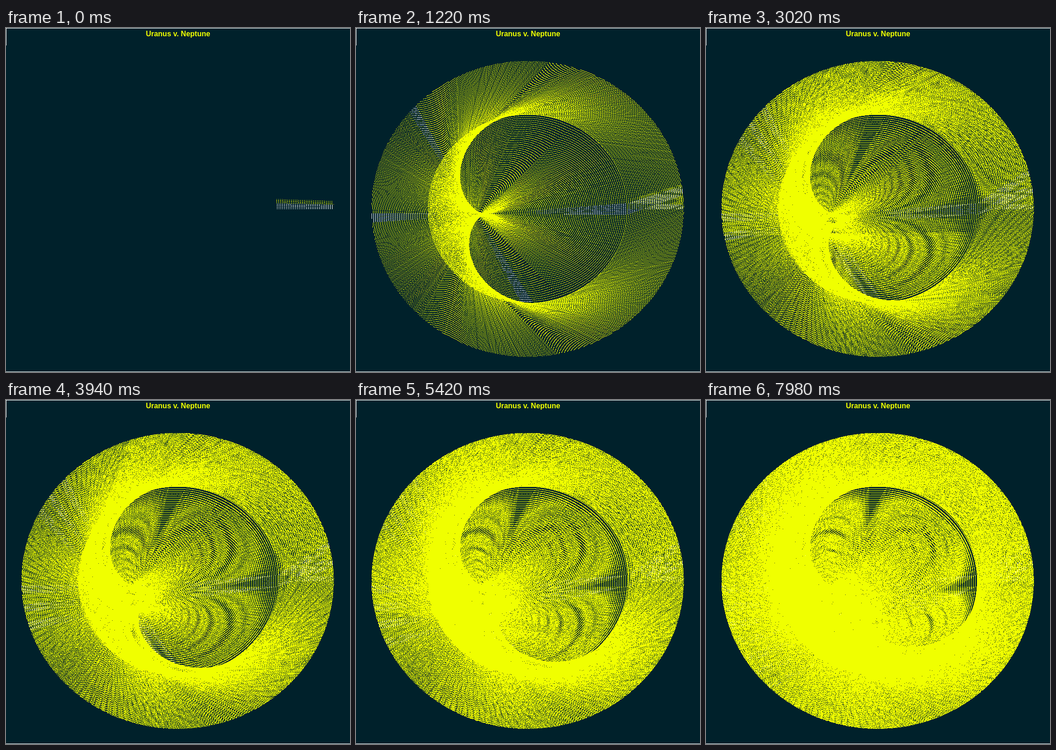
An HTML page with a canvas for the animation above (8000 ms loop, 749 by 748 pixels).

```html
<!DOCTYPE html>
<html lang="en">
<head>
<meta charset="utf-8">
<title>Uranus v. Neptune</title>
<style>
  html, body { margin: 0; width: 100%; height: 100%; overflow: hidden; background: #00212b; }
  canvas { position: absolute; left: 0; top: 0; }
  h1 {
    position: absolute; left: 0; top: 4px; width: 749px; margin: 0;
    font: bold 16px/18px "Liberation Sans", Arial, sans-serif;
    text-align: center; color: #f0ff00;
  }
</style>
</head>
<body>
<canvas id="stage" width="749" height="748"></canvas>
<h1>Uranus v. Neptune</h1>
<script>
const W = 749, H = 748;
const FRAME_MS = 20, FRAMES = 400;
const FIRST_STEPS = 16, STEPS_PER_FRAME = 33;
const DOT_GAP = 4;
const CENTER = { x: 373.2, y: 392.8 };

// Orbit radii in pixels, angular speed in degrees per step
const uranus = { rx: 216.7, ry: 205.1, speed: 0.35725 };
const neptune = { rx: 339.5, ry: 321.3, speed: 0.18212 };

const ctx = document.getElementById('stage').getContext('2d');
const image = ctx.createImageData(W, H);
const pixels = new Uint32Array(image.data.buffer);
const rgb = (r, g, b) => (255 << 24 | b << 16 | g << 8 | r) >>> 0;
const NIGHT = rgb(0, 33, 43), YELLOW = rgb(240, 255, 0), WHITE = rgb(255, 255, 255);

let nextStep = 0;

function position(planet, step) {
  const angle = planet.speed * step * Math.PI / 180;
  return {
    x: Math.round(CENTER.x + planet.rx * Math.cos(angle)),
    y: Math.round(CENTER.y - planet.ry * Math.sin(angle))
  };
}

// Dotted line from Uranus to Neptune, one pixel in four along the longer axis.
// Lines from the far right or bottom of the orbit start white; a second hit turns yellow.
function drawLine(step) {
  const from = position(uranus, step), to = position(neptune, step);
  const dx = to.x - from.x, dy = to.y - from.y;
  const length = Math.max(Math.abs(dx), Math.abs(dy));
  const turning = Math.abs(dx) >= Math.abs(dy)
    ? from.x === Math.round(CENTER.x + uranus.rx)
    : from.y === Math.round(CENTER.y + uranus.ry);
  for (let i = 0; i <= length; i += DOT_GAP) {
    const x = Math.round(from.x + dx * i / length);
    const y = Math.round(from.y + dy * i / length);
    const at = y * W + x;
    pixels[at] = turning && pixels[at] === NIGHT ? WHITE : YELLOW;
  }
}

function clearStage() {
  pixels.fill(NIGHT);
  pixels.fill(WHITE, 0, W);
  pixels.fill(WHITE, (H - 1) * W);
  for (let y = 0; y < 38; y++) pixels[y * W] = WHITE;
  nextStep = 0;
}

function render(time) {
  const frame = Math.floor(time / FRAME_MS) % FRAMES;
  const lastStep = FIRST_STEPS + STEPS_PER_FRAME * frame;
  if (nextStep === lastStep + 1) return;
  if (nextStep === 0 || nextStep > lastStep) clearStage();
  while (nextStep <= lastStep) drawLine(nextStep++);
  ctx.putImageData(image, 0, 0);
}

const start = performance.now();
function tick() {
  render(performance.now() - start);
  requestAnimationFrame(tick);
}
tick();
</script>
</body>
</html>
```
